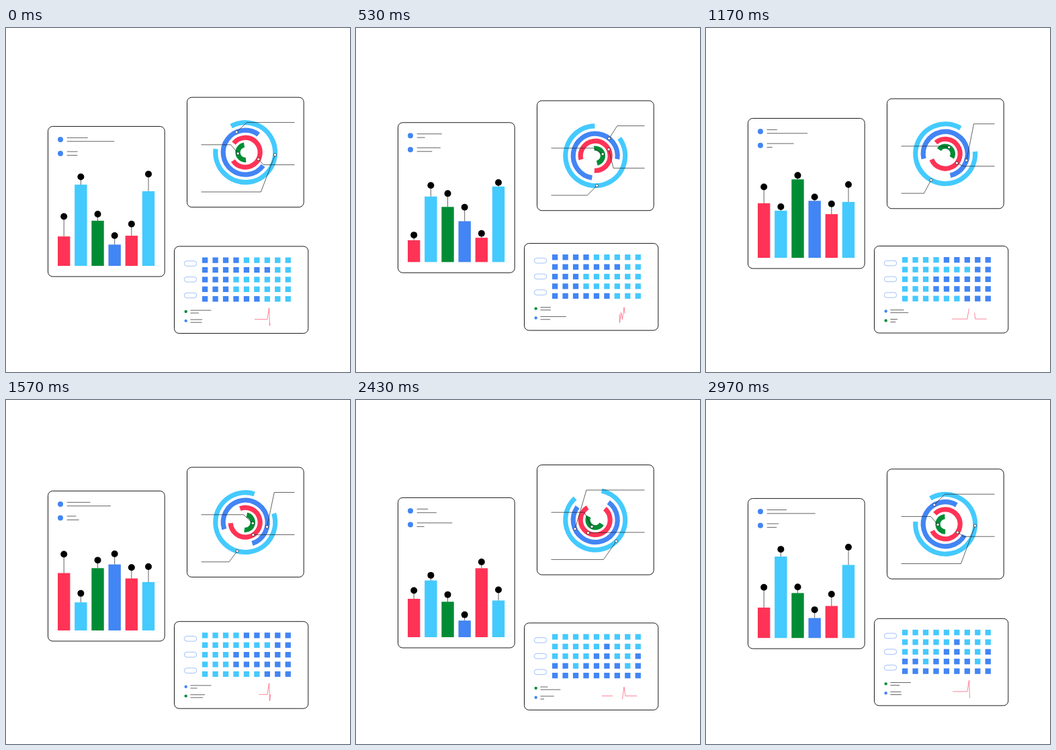
Write an HTML page that moves like this. It is 512 by 512 pixels and loops after 3000 ms.

```html
<!DOCTYPE html>
<html lang="en">
<head>
<meta charset="utf-8">
<title>Dashboard cards</title>
<style>
  html, body { margin: 0; width: 100%; height: 100%; overflow: hidden; background: #fff; }
  svg { display: block; width: 100vw; height: 100vh; }
  .card { fill: #fff; stroke: #000; stroke-width: .9; }
  .line { fill: none; stroke: #222; stroke-width: .7; }
  .pin { fill: #fff; stroke: #222; stroke-width: .7; }
  .pill { fill: #fff; stroke: #4285f4; stroke-width: .5; }
  .pulse { fill: none; stroke: #ff3356; stroke-width: .6; stroke-linejoin: bevel; }
</style>
</head>
<body>
<svg id="stage" viewBox="0 0 512 512"></svg>
<script>
const LOOP = 3000, HALF = LOOP / 2;
const SKY = '#44caff', BLUE = '#4285f4', RED = '#ff3356', GREEN = '#008c35';
const stage = document.getElementById('stage');

function set(el, attrs) {
  for (const k in attrs) el.setAttribute(k, attrs[k]);
}
function add(parent, tag, attrs) {
  const el = document.createElementNS('http://www.w3.org/2000/svg', tag);
  set(el, attrs);
  parent.append(el);
  return el;
}

// Swings of a given size that are highest at time peak: once or twice per loop.
const swing = (t, size, peak, period) => size * Math.cos((t - peak) / period * 2 * Math.PI);
const slow = (t, size, peak) => swing(t, size, peak, LOOP);
const fast = (t, size, peak) => swing(t, size, peak, HALF);

function makeCard(x, w, h, y, peak) {
  const g = add(stage, 'g', {});
  add(g, 'rect', { class: 'card', x, y: 0, width: w, height: h, rx: 7 });
  return { g, move: t => set(g, { transform: `translate(0 ${y + slow(t, 6.4, peak)})` }) };
}

function makeTextLines(g, x, rows) {
  for (const r of rows) r.el = add(g, 'line', { class: 'line', x1: x, y1: r.y, y2: r.y });
  return t => {
    for (const r of rows) set(r.el, { x2: x + r.len + fast(t, r.size, r.peak) });
  };
}

// Bar chart
const barCard = makeCard(62.5, 173.7, 223.5, 140.7, 2785);
for (const y of [19.5, 40.2]) add(barCard.g, 'circle', { cx: 81, cy: y, r: 4, fill: BLUE });
const barText = makeTextLines(barCard.g, 90.7, [
  { y: 16.9, len: 28, size: 14, peak: 325 },
  { y: 22.3, len: 41, size: 32.7, peak: 1395 },
  { y: 37.5, len: 33, size: 20, peak: 880 },
  { y: 43, len: 16, size: 8, peak: 390 }
]);
const BASE = 207.6, RIPPLE = 11, STEM = 5.7;
const bars = [
  { fill: RED, mid: 58.7, size: 22.7, peak: 1632, ripple: 1290, stem: 12.4, lift: 1420 },
  { fill: SKY, mid: 79.5, size: 39.6, peak: 168, ripple: 1220, stem: 6, lift: 380 },
  { fill: GREEN, mid: 78.3, size: 29.2, peak: 1031, ripple: 1240, stem: 7.2, lift: 480 },
  { fill: BLUE, mid: 59.5, size: 35.6, peak: 1323, ripple: 255, stem: 8.2, lift: 390 },
  { fill: RED, mid: 69, size: 33.8, peak: 2035, ripple: 885, stem: 6.1, lift: 1400 },
  { fill: SKY, mid: 83, size: 32.1, peak: 464, ripple: 105, stem: 11.3, lift: 1330 }
];
bars.forEach((b, i) => {
  const x = 77 + i * 25.16, cx = x + 9.2;
  b.rect = add(barCard.g, 'rect', { x, width: 18.4, fill: b.fill });
  b.line = add(barCard.g, 'line', { class: 'line', x1: cx, x2: cx });
  b.dot = add(barCard.g, 'circle', { cx, r: 5 });
});
function drawBars(t) {
  for (const b of bars) {
    const size = b.mid + slow(t, b.size, b.peak) + fast(t, RIPPLE, b.ripple);
    const top = BASE - size;
    const tip = top - STEM - b.stem - fast(t, b.stem, b.lift);
    set(b.rect, { y: top, height: size });
    set(b.line, { y1: top, y2: tip });
    set(b.dot, { cy: tip });
  }
}

// Ring chart, angles in degrees clockwise from the top.
// Each leader bends at an elbow that leans after its pin.
const ringCard = makeCard(269.5, 173.7, 163.5, 102.1, 670);
const CX = 356.2, CY = 82, LEFT = 290.5, RIGHT = 429.5;
const rings = [
  { fill: SKY, r: 44.4, span: 305, pin: 123, end: LEFT, y: 140.8, shift: -14, lean: .84,
    turn: t => 41.5 + slow(t, 55.5, 1310) + fast(t, 19.5, 680) },
  { fill: BLUE, r: 33, span: 270, pin: 210, end: RIGHT, y: 37.4, shift: 14, lean: .9,
    turn: t => 162 + slow(t, 101, 1101) + fast(t, 34, 80) },
  { fill: RED, r: 22, span: 288, pin: 169, end: RIGHT, y: 100.4, shift: 27, lean: 0,
    turn: t => -31 + slow(t, 62.8, 2145) + fast(t, 22, 1050) },
  { fill: GREEN, r: 11.2, span: 176, pin: 86, end: LEFT, y: 70.6, shift: -12, lean: .85,
    turn: t => 47.5 + slow(t, 114.7, 2660) + fast(t, 41.5, 1480) }
];
for (const r of rings) {
  r.arc = add(ringCard.g, 'path', { fill: 'none', stroke: r.fill, 'stroke-width': 7.2 });
}
for (const r of rings) r.lead = add(ringCard.g, 'polyline', { class: 'line' });
for (const r of rings) r.knob = add(ringCard.g, 'circle', { class: 'pin', r: 2.1 });

function polar(r, deg) {
  const a = deg * Math.PI / 180;
  return [CX + r * Math.sin(a), CY - r * Math.cos(a)];
}
function drawRings(t) {
  for (const r of rings) {
    const a = r.turn(t);
    const [px, py] = polar(r.r, a + r.pin);
    const elbow = CX + r.shift + r.lean * (px - CX);
    const large = r.span > 180 ? 1 : 0;
    set(r.arc, { d: `M${polar(r.r, a)}A${r.r} ${r.r} 0 ${large} 1 ${polar(r.r, a + r.span)}` });
    set(r.lead, { points: `${px},${py} ${elbow},${r.y} ${r.end},${r.y}` });
    set(r.knob, { cx: px, cy: py });
  }
}

// Grid card
const gridCard = makeCard(250.5, 199.3, 129.5, 326.9, 2105);
for (let i = 0; i < 3; i++) {
  add(gridCard.g, 'rect',
    { class: 'pill', x: 265.3, y: 21.8 + i * 23.7, width: 18.4, height: 7.6, rx: 3.8 });
}
const ROW_FILL = [4, 7, 3, 3, 6];
const COL_FILL = [2, 2, 1, 2, 3, 4, 2, 1, 3];
const cells = [];
for (let row = 0; row < 5; row++) {
  for (let col = 0; col < 9; col++) {
    const el = add(gridCard.g, 'rect',
      { x: 292 + col * 15.45, y: 16.5 + row * 14.4, width: 8.3, height: 8.3 });
    cells.push({ el, row, col });
  }
}
const legend = [97, 110.9].map(cy => add(gridCard.g, 'circle', { cx: 267.7, cy, r: 2.2 }));
const gridText = makeTextLines(gridCard.g, 274.4, [
  { y: 95.2, len: 20.3, size: 10.8, peak: 50 },
  { y: 99.2, len: 19, size: 11.2, peak: 980 },
  { y: 109, len: 24.3, size: 14.4, peak: 490 },
  { y: 113.2, len: 12.8, size: 7.3, peak: 220 }
]);
const PULSE_LEN = 139.4, PULSE_ON = 65;
const pulse = add(gridCard.g, 'path', {
  class: 'pulse', pathLength: PULSE_LEN,
  d: 'M366 108.6H388.8L391.6 92L392.5 118L394.5 103L396.5 113L399 95.3L400.8 108.6H418',
  'stroke-dasharray': `${PULSE_ON} ${PULSE_LEN - PULSE_ON}`
});

// Rows fill from the left, then swap colours, then columns fill from the bottom.
function isBlue(phase, row, col) {
  if (phase === 2) return 5 - row <= COL_FILL[col];
  return (col < ROW_FILL[row]) === (phase === 0);
}
function drawGrid(t) {
  const phase = Math.floor(t / 1000);
  for (const c of cells) set(c.el, { fill: isBlue(phase, c.row, c.col) ? BLUE : SKY });
  set(legend[0], { fill: phase === 1 ? BLUE : GREEN });
  set(legend[1], { fill: phase === 1 ? GREEN : BLUE });
  const start = 3.9 + t / HALF * PULSE_LEN;
  set(pulse, { 'stroke-dashoffset': -(start % PULSE_LEN) });
}

const parts = [barCard.move, ringCard.move, gridCard.move,
  barText, gridText, drawBars, drawRings, drawGrid];
const begin = performance.now();
function tick() {
  const t = (performance.now() - begin) % LOOP;
  for (const draw of parts) draw(t);
  requestAnimationFrame(tick);
}
tick();
</script>
</body>
</html>
```
